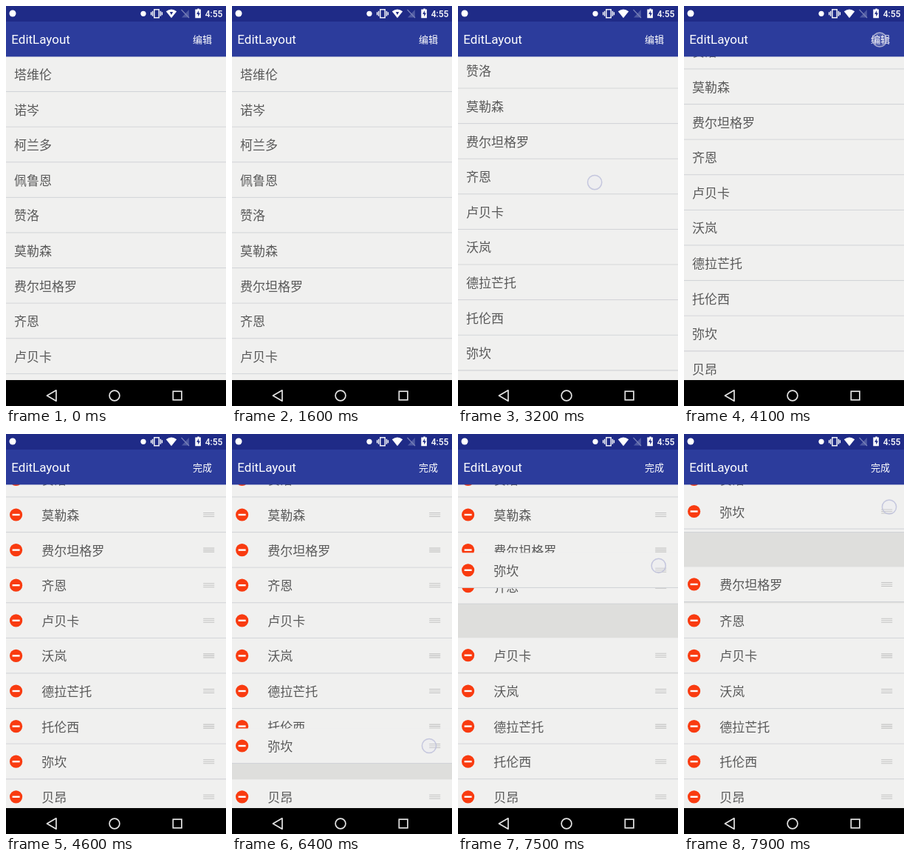
These frames come from a looping animation (298x540 px, 8 s). An HTML page:

```html
<!DOCTYPE html>
<html lang="zh-CN">
<head>
<meta charset="utf-8">
<title>EditLayout</title>
<style>
  html, body { margin: 0; width: 100%; height: 100%; overflow: hidden; background: #000; }
  svg { display: block; width: 298px; height: 540px; font-family: Roboto, "Noto Sans CJK SC", "Noto Sans CJK", sans-serif; }
  .name { font: 17px "Noto Sans CJK SC", "Noto Sans CJK", sans-serif; fill: #595959; }
  .action { font: 13px "Noto Sans CJK SC", "Noto Sans CJK", sans-serif; fill: #fff; }
  .nav { fill: none; stroke: #e4e4e4; stroke-width: 1.7; }
</style>
</head>
<body>
<svg viewBox="0 0 298 540">
  <defs>
    <g id="minus">
      <circle r="8.6" fill="#f93b10"/>
      <rect x="-5" y="-1.2" width="10" height="2.4" fill="#fff"/>
    </g>
    <path id="grip" d="M-7.5-2.5h15M-7.5 0h15M-7.5 2.5h15" stroke="#c3c3c3" stroke-width="1.1"/>
  </defs>

  <rect y="68" width="298" height="437" fill="#dededc"/>
  <g id="list"></g>

  <rect width="298" height="68.4" fill="#2c3c9c"/>
  <rect width="298" height="21" fill="#1f2b87"/>
  <text x="7.3" y="51" font-size="17" fill="#fff">EditLayout</text>
  <text id="action" class="action" x="253" y="50">编辑</text>

  <g fill="#fff">
    <circle cx="9" cy="10" r="4.5"/>
    <circle cx="186" cy="10.3" r="3.6"/>
    <path d="M216.8 7.2Q224 1.8 231.2 7.2L224 16.2Z"/>
    <path d="M258.3 4.6h1v-1h2.4v1h2.2v11.6h-7.6v-11.6z"/>
    <text x="269.8" y="14.8" font-size="12" font-weight="500">4:55</text>
  </g>
  <path id="weak" d="M221.8 8h4.4L224 12Z" fill="#1f2b87"/>
  <path d="M261 6l-2.8 5h2v3.4l2.8-5h-2z" fill="#1f2b87"/>
  <g fill="none" stroke="#fff" stroke-width="1.4">
    <rect x="200.8" y="4.8" width="6.4" height="11"/>
    <path d="M198.6 6.8v7M196.6 8.3v4M209.4 6.8v7M211.4 8.3v4"/>
  </g>
  <path d="M238 15.5h9.8v-10.5z" fill="#4f5aa3"/>
  <path d="M237.5 5l10.5 11" stroke="#7982b8" stroke-width="1.2"/>

  <rect y="505" width="298" height="35"/>
  <path class="nav" d="M55.5 526L68 518.8V533.2Z" stroke-linejoin="round"/>
  <circle class="nav" cx="147" cy="526" r="6.9"/>
  <rect class="nav" x="226.3" y="520.2" width="11.6" height="11.6"/>

  <circle id="touch" r="9.6" fill="#e8e8f4" fill-opacity=".2" stroke="#bdc0db" stroke-opacity=".85" stroke-width="1.5"/>
</svg>

<script>
const LOOP = 8000, STEP = 100;
const TOP = 68, ROW = 47.6, MID = 24;
const MOVED = 12, GRAB = 6000, SHIFT = 250;
const names = ['塔维伦', '诺岑', '柯兰多', '佩鲁恩', '赞洛', '莫勒森', '费尔坦格罗',
  '齐恩', '卢贝卡', '沃岚', '德拉芒托', '托伦西', '弥坎', '贝昂'];

const swipes = [
  { start: 2200, time: 700, by: 151, finger: 304 },
  { start: 2950, time: 766, by: 70, finger: 433 }
];
// Time and centre of the dragged row
const drag = [[GRAB, 442], [6400, 421], [6900, 347], [7200, 254], [7700, 137], [7900, 104.5]];
const dragBack = drag.map(([t, y]) => [y, t]).reverse();

const $ = id => document.getElementById(id);
const clamp = x => Math.min(1, Math.max(0, x));
const ease = x => (1 - Math.cos(Math.PI * clamp(x))) / 2;
const fling = x => 1 - (1 - clamp(x)) ** 2.5;
const move = (el, x, y) => el.setAttribute('transform', `translate(${x.toFixed(2)} ${y.toFixed(2)})`);

function at(keys, x) {
  const i = keys.findIndex(k => x <= k[0]);
  if (i === 0) return keys[0][1];
  if (i < 0) return keys[keys.length - 1][1];
  const [x0, y0] = keys[i - 1], [x1, y1] = keys[i];
  return y0 + (y1 - y0) * (x - x0) / (x1 - x0);
}

const scroll = t => swipes.reduce((sum, s) => sum + s.by * fling((t - s.start) / s.time), 0);
const homeTop = i => TOP + ROW * i;

function makeRow(name) {
  const el = document.createElementNS('http://www.w3.org/2000/svg', 'g');
  el.innerHTML = `<rect y=".5" width="298" height="${ROW - 0.5}" fill="#f0f0ef"/>
    <rect y="${ROW - 0.5}" width="298" height="1" fill="#d0d2d6"/>
    <use href="#minus"/><text class="name" y="31">${name}</text><use href="#grip"/>`;
  $('list').append(el);
  const [minus, text, grip] = [...el.children].slice(2);
  return { el, minus, text, grip };
}

const rows = names.map(makeRow);
$('list').append(rows[MOVED].el);

// A row slides down once the dragged row has covered a third of it
const endScroll = scroll(LOOP), dragEnd = at(drag, LOOP);
const pushAt = rows.map((_, i) => {
  const limit = homeTop(i) - endScroll + MID - 14;
  return i < MOVED && limit > dragEnd ? at(dragBack, limit) : Infinity;
});

function finger(t) {
  const swipe = swipes.find(s => t > s.start && t <= s.start + 450);
  if (swipe) {
    const y = swipe.finger - scroll(t);
    return [212 - 0.4 * (y - 171), y];
  }
  if (t >= 4100 && t <= 4200) return [265, 45.5];
  if (t >= 5900) return [267 + 11 * clamp((t - 7200) / 700), at(drag, t) + 3 - 9 * clamp((t - 6100) / 900)];
}

function draw(t) {
  const offset = scroll(t);
  const open = ease((t - 4150) / 450);
  const aside = 37 * (1 - open);

  rows.forEach((r, i) => {
    const dragged = i === MOVED && t > GRAB;
    const y = homeTop(i) - offset + ROW * ease((t - pushAt[i]) / SHIFT);
    move(r.el, 0, dragged ? at(drag, t) - MID : y);
    move(r.minus, 13.6 - aside, MID);
    move(r.grip, 274.7 + aside, MID);
    r.text.setAttribute('x', 11 + 37.3 * open);
  });

  $('action').textContent = t < 4200 ? '编辑' : '完成';
  $('weak').style.display = t < 2900 ? '' : 'none';

  const spot = finger(t);
  $('touch').style.display = spot ? '' : 'none';
  if (spot) move($('touch'), ...spot);
}

const start = performance.now();
function tick() {
  const t = (performance.now() - start) % LOOP;
  draw(Math.floor(t / STEP) * STEP);
  requestAnimationFrame(tick);
}
tick();
</script>
</body>
</html>
```
